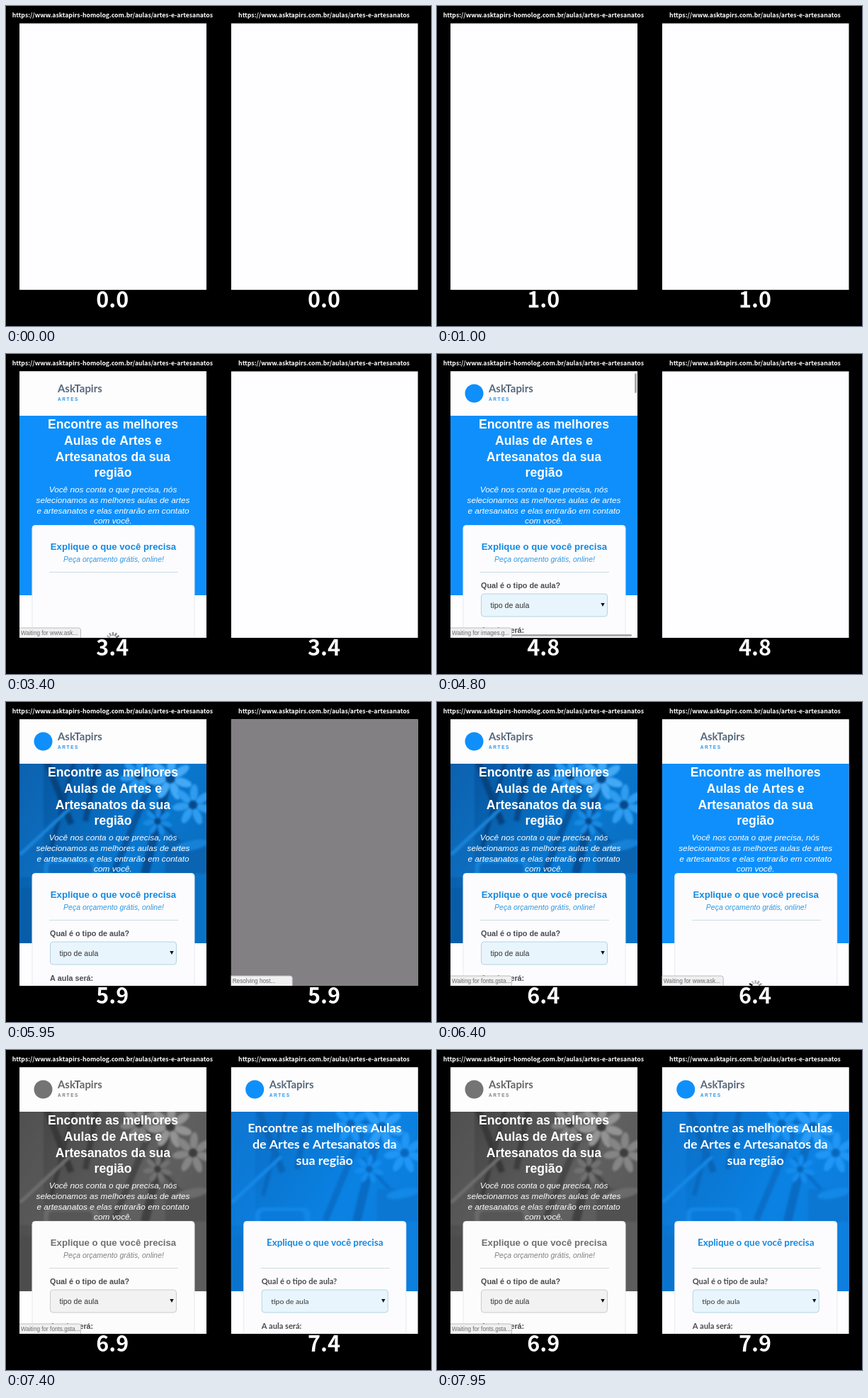
An HTML page with a canvas that plays this animation: 600x451 px, repeating every 8 s.

```html
<!DOCTYPE html>
<html lang="pt-BR">
<head>
<meta charset="utf-8">
<title>Page load comparison</title>
<style>
html, body { margin: 0; width: 100%; height: 100%; overflow: hidden; background: #000; }
canvas { display: block; }
</style>
</head>
<body>
<canvas id="stage" width="600" height="451"></canvas>
<script>
const ctx = document.getElementById('stage').getContext('2d');
const LOOP = 8000;
const ARIAL = '"Liberation Sans", sans-serif';
const LATO = 'Lato, sans-serif';
const LABEL = '"Noto Sans CJK JP", "Noto Sans CJK SC", "Noto Sans CJK", sans-serif';
const BLUE = '#0f8ffb';
const PAGE = { x: 19, y: 24.5, w: 264, h: 375.5 };

// Times in ms at which each part of a page shows up.
const panes = [
  {
    x: 0, center: 150.3, url: 'https://www.asktapirs-homolog.com.br/aulas/artes-e-artesanatos',
    grey: 2900, page: 3100, form: 4500, photo: 5300, fonts: Infinity, done: 6950, bars: [4500, 5100],
    status: [[2900, 'Resolving host...'], [3100, 'Waiting for www.ask...'], [4500, 'Waiting for images.g...'],
      [5300, ''], [6200, 'Waiting for fonts.gsta...']]
  },
  {
    x: 298.7, center: 449, url: 'https://www.asktapirs.com.br/aulas/artes-e-artesanatos',
    grey: 5850, page: 6150, form: 6450, photo: 6650, fonts: 7300, done: Infinity, bars: [6450, 6800],
    status: [[5850, 'Resolving host...'], [6150, 'Waiting for www.ask...'], [6450, 'Waiting for images.g...'], [7300, '']]
  }
];

function rect(x, y, w, h, color) {
  ctx.fillStyle = color;
  ctx.fillRect(x, y, w, h);
}

function box(x, y, w, h, r, fill, stroke) {
  ctx.beginPath();
  ctx.roundRect(x, y, w, h, r);
  ctx.fillStyle = fill;
  ctx.fill();
  if (stroke) {
    ctx.strokeStyle = stroke;
    ctx.lineWidth = 1;
    ctx.stroke();
  }
}

function text(str, x, y, font, color, align = 'left', spacing = 0) {
  ctx.font = font;
  ctx.fillStyle = color;
  ctx.textAlign = align;
  ctx.letterSpacing = spacing + 'px';
  ctx.fillText(str, x, y);
}

function lines(list, y, step, font, color) {
  list.forEach((str, i) => text(str, 151, y + i * step, font, color, 'center'));
}

function ellipse(x, y, rx, ry, angle, color) {
  ctx.beginPath();
  ctx.ellipse(x, y, rx, ry, angle, 0, Math.PI * 2);
  ctx.fillStyle = color;
  ctx.fill();
}

function stroke(x1, y1, x2, y2, width, color) {
  ctx.beginPath();
  ctx.moveTo(x1, y1);
  ctx.lineTo(x2, y2);
  ctx.lineWidth = width;
  ctx.strokeStyle = color;
  ctx.stroke();
}

function flower(x, y, r, color) {
  for (let i = 0; i < 7; i++) {
    const a = i * Math.PI * 2 / 7 + 0.3;
    ellipse(x + Math.cos(a) * r * 0.6, y + Math.sin(a) * r * 0.6, r * 0.45, r * 0.2, a, color);
  }
  ellipse(x, y, r * 0.22, r * 0.22, 0, '#06498b');
}

// Soft blue still life behind the headline.
function photo(bright) {
  ctx.save();
  ctx.beginPath();
  ctx.rect(19, 87, 264, 253);
  ctx.clip();
  const g = ctx.createLinearGradient(19, 87, 283, 240);
  g.addColorStop(0, '#075098');
  g.addColorStop(0.35, '#0866b5');
  g.addColorStop(0.65, '#0878d0');
  g.addColorStop(1, '#0b6dbe');
  rect(19, 87, 264, 253, g);
  ctx.filter = 'blur(1.5px)';
  rect(19, 87, 34, 160, 'rgba(20,120,205,.45)');
  stroke(58, 85, 92, 172, 9, '#06447f');
  stroke(96, 85, 64, 205, 6, '#06498b');
  stroke(128, 85, 112, 168, 8, '#064a8c');
  stroke(20, 215, 90, 150, 5, '#1b84d8');
  stroke(152, 240, 210, 100, 9, '#07559f');
  stroke(196, 242, 226, 120, 12, '#064f96');
  stroke(246, 200, 204, 152, 5, '#06549f');
  flower(188, 104, 26, '#2898ee');
  flower(232, 108, 30, '#43a9f6');
  flower(264, 145, 28, '#2f9cf0');
  flower(214, 168, 20, '#1989e2');
  rect(225, 196, 58, 46, '#0a64b1');
  ellipse(262, 202, 24, 7, -0.2, '#1682d7');
  box(53, 222, 78, 40, 9, '#1681d6');
  box(60, 227, 62, 30, 6, '#086ac0');
  rect(19, 262, 18, 78, '#085da9');
  rect(266, 242, 17, 98, '#0a73c7');
  ctx.filter = 'none';
  if (bright) rect(19, 87, 264, 253, 'rgba(15,143,251,.45)');
  ctx.restore();
}

function header(hasLogo) {
  rect(19, 24, 264, 63, '#fdfdfe');
  if (hasLogo) ellipse(52.5, 55.5, 13, 13, 0, BLUE);
  text('AskTapirs', 73, 53.5, `bold 14.9px ${LATO}`, '#56687a');
  text('ARTES', 73, 66, `bold 6.5px ${ARIAL}`, '#2b98ee', 'left', 1.6);
}

function hero(pane, t) {
  rect(19, 87, 264, 253, BLUE);
  if (t >= pane.photo) photo(t >= pane.fonts);
  if (t >= pane.fonts) {
    lines(['Encontre as melhores Aulas', 'de Artes e Artesanatos da', 'sua região'], 116, 22.8, `bold 17.8px ${LATO}`, '#fff');
    return;
  }
  lines(['Encontre as melhores', 'Aulas de Artes e', 'Artesanatos da sua', 'região'], 105, 22.8, `bold 17.6px ${ARIAL}`, '#fff');
  lines(['Você nos conta o que precisa, nós', 'selecionamos as melhores aulas de artes',
    'e artesanatos e elas entrarão em contato', 'com você.'], 195, 14.8, `italic 11.8px ${ARIAL}`, '#fff');
}

function card(pane, t) {
  const lato = t >= pane.fonts;
  const face = lato ? LATO : ARIAL;
  box(37, 241.5, 229, 180, 4, '#fcfcfe', '#e6e9ef');
  text('Explique o que você precisa', 151.5, 276, `bold ${lato ? 13.4 : 13.2}px ${face}`, '#1589e0', 'center');
  if (!lato) text('Peça orçamento grátis, online!', 152, 293, `italic 10.5px ${ARIAL}`, '#3297de', 'center');
  rect(61, 307, 182, 1, '#c9dbe6');
  if (t < pane.form) return;
  const label = `bold ${lato ? 11.1 : 10.8}px ${face}`;
  text('Qual é o tipo de aula?', 62, 330, label, '#4a4a50');
  box(62.5, 338, 178, 32, 4, '#e9f5fc', '#b4d3e3');
  text('tipo de aula', 75.5, 358, `${lato ? 10.4 : 10.6}px ${face}`, '#333');
  ctx.beginPath();
  ctx.moveTo(231.3, 351);
  ctx.lineTo(236.7, 351);
  ctx.lineTo(234, 356);
  ctx.fillStyle = '#111';
  ctx.fill();
  text('A aula será:', 62, 393, label, '#4a4a50');
}

function spinner(t) {
  const head = Math.floor(t / 80) % 12;
  for (let i = 0; i < 12; i++) {
    const a = i * Math.PI / 6;
    const shade = 0.25 + 0.75 * ((i - head + 12) % 12) / 11;
    const c = Math.cos(a), s = Math.sin(a);
    stroke(151 + c * 5, 402 + s * 5, 151 + c * 10, 402 + s * 10, 2.3, `rgba(20,20,20,${shade})`);
  }
}

function status(pane, t) {
  const current = pane.status.filter(([from]) => t >= from).pop();
  if (!current || !current[1]) return;
  box(16, 386, 89.5, 18, 3, '#f0f0f1', '#bcbcbf');
  text(current[1], 21, 395.5, `8.2px ${ARIAL}`, '#6a6a6d');
}

function drawPage(pane, t) {
  ctx.save();
  ctx.translate(pane.x, 0);
  ctx.beginPath();
  ctx.rect(PAGE.x, PAGE.y, PAGE.w, PAGE.h);
  ctx.clip();
  rect(PAGE.x, 24, PAGE.w, 377, '#fefdff');
  if (t >= pane.page) {
    header(t >= pane.form);
    hero(pane, t);
    card(pane, t);
    if (t < pane.form) spinner(t);
    if (t >= pane.bars[0] && t < pane.bars[1]) {
      box(279, 27, 3, 28, 1.5, '#a9a9ad');
      box(60, 395, 215, 3, 1.5, '#a9a9ad');
    }
  } else if (t >= pane.grey) {
    rect(PAGE.x, 24, PAGE.w, 377, '#828083');
  }
  status(pane, t);
  if (t >= pane.done) {
    ctx.globalCompositeOperation = 'saturation';
    rect(PAGE.x, 24, PAGE.w, 377, '#808080');
  }
  ctx.restore();
}

function draw(t) {
  rect(0, 0, 600, 451, '#000');
  for (const pane of panes) {
    drawPage(pane, t);
    text(pane.url, pane.center, 16, `bold 8.7px ${LABEL}`, '#fff', 'center');
    const tenths = Math.floor(Math.min(t, pane.done) / 100 + 1e-6);
    text((tenths / 10).toFixed(1), pane.center, 425, `bold 30.5px ${LABEL}`, '#fff', 'center');
  }
}

function tick() {
  draw(performance.now() % LOOP);
  requestAnimationFrame(tick);
}
tick();
</script>
</body>
</html>
```
